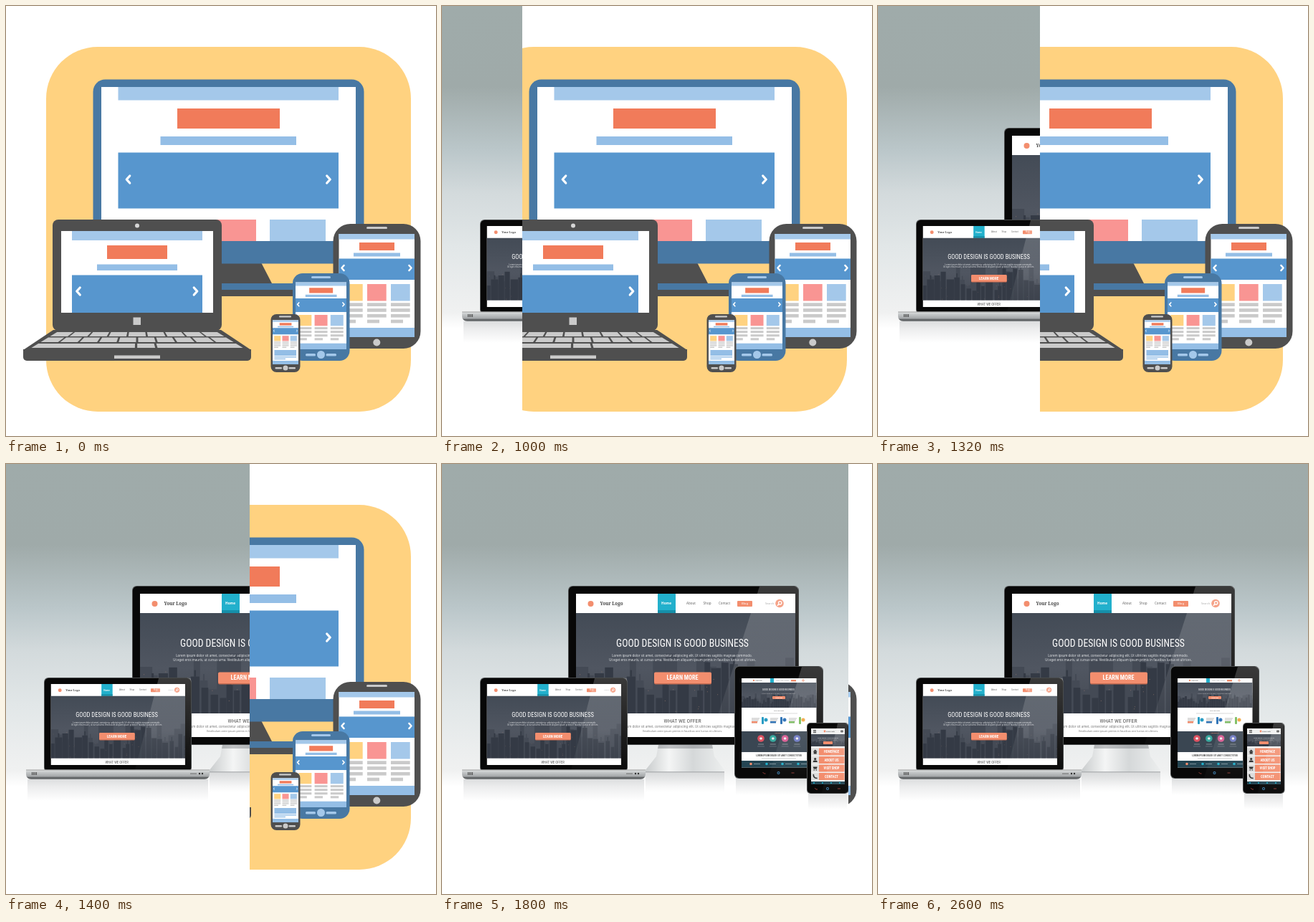
Animation, 600 px wide and 600 px high, one loop 3 s. Source, as an HTML page with a canvas:

```html
<!DOCTYPE html>
<html lang="en">
<head>
<meta charset="utf-8">
<title>Responsive devices wipe</title>
<style>
  html, body { margin: 0; width: 100%; height: 100%; overflow: hidden; background: #fff; }
  canvas { display: block; }
</style>
</head>
<body>
<canvas id="stage" width="600" height="600"></canvas>
<script>
const ctx = document.getElementById('stage').getContext('2d');
const SANS = '"Noto Sans", "Open Sans", sans-serif';
const SLAB = '"Noto Serif", "Liberation Serif", serif';
const NARROW = '"Roboto Condensed", "Liberation Sans Narrow", "Open Sans", Roboto, sans-serif';
const DARK = '#4f4f4f', STEEL = '#4878a3', SKY = '#a4c8ea', SOFT = '#94bee6', BLUE = '#5796ce';
const CORAL = '#f17b5a', PINK = '#f99593', SAND = '#ffd280', GREY = '#cacaca';
const ORANGE = '#f38e6e', TEAL = '#22b0cc', BLACK = '#080808', WHITE = '#fff';

// Shapes are given by their left, top, right and bottom edges.
function box(fill, x1, y1, x2, y2, radius = 0) {
  ctx.fillStyle = fill;
  ctx.beginPath();
  ctx.roundRect(x1, y1, x2 - x1, y2 - y1, radius);
  ctx.fill();
}
function dot(fill, x, y, r) {
  ctx.fillStyle = fill;
  ctx.beginPath();
  ctx.arc(x, y, r, 0, Math.PI * 2);
  ctx.fill();
}
function poly(fill, ...points) {
  ctx.fillStyle = fill;
  ctx.beginPath();
  points.forEach(([x, y]) => ctx.lineTo(x, y));
  ctx.fill();
}
function line(color, width, ...points) {
  ctx.strokeStyle = color;
  ctx.lineWidth = width;
  ctx.beginPath();
  points.forEach(([x, y]) => ctx.lineTo(x, y));
  ctx.stroke();
}
function shade(x1, y1, x2, y2, stops) {
  const g = ctx.createLinearGradient(x1, y1, x2, y2);
  stops.forEach(([at, color]) => g.addColorStop(at, color));
  return g;
}
function text(str, x, y, size, color, { font = SANS, weight = 400, align = 'center' } = {}) {
  ctx.fontStretch = font === NARROW ? 'extra-condensed' : 'normal';
  ctx.font = `${weight} ${size}px ${font}`;
  ctx.textAlign = align;
  ctx.textBaseline = 'middle';
  ctx.fillStyle = color;
  ctx.fillText(str, x, y);
}
// Picks the type size at which the line has the given length.
function textLine(str, x, y, length, color, style = {}) {
  const { font = SANS, weight = 400 } = style;
  ctx.fontStretch = font === NARROW ? 'extra-condensed' : 'normal';
  ctx.font = `${weight} 100px ${font}`;
  text(str, x, y, 100 * length / ctx.measureText(str).width, color, style);
}
const narrow = (str, x, y, length, color, weight = 400) =>
  textLine(str, x, y, length, color, { font: NARROW, weight });
const random = n => { const v = Math.sin(n * 12.9898) * 43758.5453; return v - Math.floor(v); };

function clipped(x1, y1, x2, y2, draw) {
  ctx.save();
  ctx.beginPath();
  ctx.rect(x1, y1, x2 - x1, y2 - y1);
  ctx.clip();
  draw();
  ctx.restore();
}

// ---- Flat scene ----
function arrows(left, right, y, size) {
  ctx.lineCap = ctx.lineJoin = 'round';
  [[left, 1], [right, -1]].forEach(([x, dir]) => line(WHITE, size * 0.65,
    [x + dir * size * 0.45, y - size], [x - dir * size * 0.45, y], [x + dir * size * 0.45, y + size]));
  ctx.lineCap = 'butt';
  ctx.lineJoin = 'miter';
}

function page(left, top, sx, sy, footer) {
  const part = (fill, x1, y1, x2, y2) =>
    box(fill, left + x1 * sx, top + y1 * sy, left + x2 * sx, top + y2 * sy);
  part(WHITE, 0, 0, 105.5, 144);
  part(SKY, 0, 0, 105.5, 7.5);
  part(CORAL, 28.5, 12, 77.5, 23);
  part(SOFT, 20.5, 26.5, 85.5, 31.5);
  part(BLUE, 0, 34.5, 105.5, 64);
  arrows(left + 5.5 * sx, left + 99.5 * sx, top + 47.5 * sy, 3.6 * sx);
  [SAND, PINK, SKY].forEach((color, i) => {
    const x = 6.5 + i * 33;
    part(color, x, 70, x + 26.7, 93.5);
    for (let row = 0; row < 4; row++)
      part(GREY, x, 96.3 + row * 7.8, x + (row < 3 ? 26.7 : 17), 101 + row * 7.8);
  });
  part(SOFT, 0, footer, 105.5, 144);
}

function keyRow(top, bottom, edges) {
  const at = (u, y) => [183 + u * (113 + (y - 455) * 1.65), y];
  for (let i = 0; i + 1 < edges.length; i++) {
    const a = edges[i] + 0.011, b = edges[i + 1] - 0.011;
    poly(GREY, at(a, top), at(b, top), at(b, bottom), at(a, bottom));
  }
}
const evenEdges = n => Array.from({ length: n + 1 }, (_, i) => i * 2 / n - 1);

function flatScene() {
  box(WHITE, 0, 0, 600, 600);
  box(SAND, 56, 57, 565, 566, 72);

  // Desktop
  poly(DARK, [250, 358], [356, 358], [371, 387], [250, 387]);
  box(STEEL, 200, 387, 410, 396);
  box(DARK, 200, 396, 410, 405);
  box(STEEL, 121.5, 102.5, 499.5, 359.5, 17);
  box(WHITE, 133, 113, 488, 328);
  box(SKY, 156.5, 113, 464, 131.5);
  box(CORAL, 239, 143, 382, 171);
  box(SOFT, 215.5, 182, 405, 194);
  box(BLUE, 156.5, 204.5, 464, 282.5);
  arrows(170.5, 450, 242, 5);
  box(PINK, 271, 298, 349, 328);
  box(SKY, 368, 298, 446, 328);

  // Laptop
  box(DARK, 65, 298, 301, 453, 8);
  dot('#d5d5d5', 183, 306.5, 3);
  box(WHITE, 77, 314, 289, 428);
  box(SKY, 92, 314, 274, 327);
  box(CORAL, 141, 334, 225, 353);
  box(SOFT, 127, 360.5, 239, 369);
  box(BLUE, 92, 375.5, 274, 428);
  arrows(101, 264.5, 398, 5);
  box(GREY, 177.5, 434.5, 188, 445);
  poly(DARK, [66, 452], [300, 452], [342, 480], [24, 480]);
  box(DARK, 24, 479, 342, 495, [0, 0, 5, 5]);
  keyRow(455, 461, evenEdges(9));
  keyRow(462.5, 469, evenEdges(10));
  keyRow(471, 477, [-1, -0.01, 0.18, 1]);
  box(GREY, 151, 487.5, 215, 492);

  // Tablet
  box(DARK, 456.5, 304, 578.5, 478, 24);
  box(GREY, 503, 308, 532, 311, 1.5);
  page(464.5, 318, 1, 1, 131);
  dot(GREY, 517.3, 469.5, 5);

  // Large phone
  box(STEEL, 400, 373, 479.5, 495, 14);
  box(SKY, 426, 377, 453, 380, 1.5);
  page(404, 385.5, 0.673, 0.65, 131);
  dot(SKY, 439.5, 486.5, 5.5);
  box(SKY, 418, 485, 432, 488.5, 1.5);
  box(SKY, 446.5, 485, 461, 488.5, 1.5);

  // Small phone
  box(DARK, 369.5, 430, 410.5, 511, 8);
  box(GREY, 381, 432.3, 398, 434.5, 1);
  box(WHITE, 372, 438.5, 408, 500);
  page(372, 438.5, 0.341, 0.31, 144);
  box(WHITE, 372, 479, 408, 500);
  box(SOFT, 374.5, 480, 405, 488);
  box(SOFT, 374.5, 489, 405, 490.5);
  box(SOFT, 374.5, 491.7, 390, 493.2);
  box(SOFT, 372, 495, 408, 500);
  dot(GREY, 390, 505, 3.5);
  box(GREY, 375.5, 504, 385, 506.5, 1);
  box(GREY, 394.5, 504, 404, 506.5, 1);
}

// ---- Glossy scene ----
function skyline(x1, y1, x2, y2) {
  const height = y2 - y1, unit = height / 140;
  box(shade(0, y1, 0, y2, [[0, '#434b56'], [0.55, '#505661'], [1, '#454a54']]), x1, y1, x2, y2);
  clipped(x1, y1, x2, y2, () => {
    ['#444a55', '#343a45'].forEach((color, layer) => {
      for (let x = x1, n = 1 + layer * 50; x < x2; n++) {
        const width = (7 + random(n) * 11) * unit;
        const top = y2 - height * (0.2 + 0.4 * random(n + 0.5) - layer * 0.06);
        box(color, x, top, x + width, y2);
        if (n % 4 === 0) box(color, x + width * 0.4, top - 9 * unit, x + width * 0.6, top);
        x += width * (1 + layer * 0.35 * random(n + 0.2));
      }
    });
    for (let n = 1; n < 26; n++) {
      const x = x1 + (x2 - x1) * random(n * 3), y = y2 - height * 0.42 * random(n * 7);
      box('rgba(190,145,125,.5)', x, y, x + unit, y + unit);
    }
  });
}

function magnifier(x, y, r) {
  dot(ORANGE, x, y, r);
  ctx.beginPath();
  ctx.arc(x + r * 0.12, y - r * 0.12, r * 0.38, 0, Math.PI * 2);
  ctx.strokeStyle = WHITE;
  ctx.lineWidth = r * 0.22;
  ctx.stroke();
  line(WHITE, r * 0.25, [x - r * 0.15, y + r * 0.15], [x - r * 0.55, y + r * 0.55]);
}

function website() {
  box(WHITE, 187, 181, 493, 381);
  dot(ORANGE, 207.5, 195, 4);
  textLine('Your Logo', 236.5, 195, 32, '#444', { font: SLAB, weight: 700 });
  box(TEAL, 301, 181, 326, 208);
  box('#168fa9', 301, 204, 326, 208);
  textLine('Home', 313, 195, 14, WHITE, { weight: 700 });
  textLine('About', 347.5, 195, 13, '#666');
  textLine('Shop', 370, 195, 11, '#666');
  textLine('Contact', 394, 195, 16, '#666');
  box(ORANGE, 412, 191, 433, 199, 1);
  textLine('Blog', 422.5, 195, 9, WHITE);
  textLine('Search', 457, 195, 12, '#999');
  magnifier(471, 194.5, 5.8);

  skyline(187, 208, 493, 348);
  narrow('GOOD DESIGN IS GOOD BUSINESS', 335.5, 251, 185, WHITE);
  textLine('Lorem ipsum dolor sit amet, consectetur adipiscing elit. Ut ultricies sagittis magnae commodo.',
    335, 268, 196, '#e4e6e8');
  textLine('Ut eget eros mauris, ut cursus urna. Vestibulum aliquam ipsum primis in faucibus luctus et ultrices.',
    335.5, 273.5, 205, '#e4e6e8');
  box('#c96f54', 296, 292, 376, 307.5, 2);
  box(ORANGE, 296, 290.5, 376, 306, 2);
  narrow('LEARN MORE', 335.5, 299, 44, WHITE, 700);
  narrow('WHAT WE OFFER', 335.5, 358.5, 52, '#555');
  textLine('Lorem ipsum dolor sit amet, consectetur adipiscing elit. Ut ultricies sagittis magnae commodo.',
    335, 367, 196, '#777');
  textLine('Vestibulum ante ipsum primis in faucibus orci luctus et ultrices.', 335.5, 372.5, 112, '#777');
}

function casing(x1, y1, x2, y2, radius) {
  box('#5c5f60', x1, y1, x2, y2, radius);
  box(BLACK, x1 + 0.8, y1 + 0.8, x2 - 0.8, y2 - 0.8, radius);
}
function glare(x1, x2, top, right, bottom) {
  poly(shade(0, top, 0, bottom, [[0, 'rgba(255,255,255,.2)'], [1, 'rgba(255,255,255,.02)']]),
    [x1, top], [right, top], [right, bottom], [x2, bottom]);
}
function reflection(x1, x2, top, bottom) {
  box(shade(0, top, 0, bottom, [[0, 'rgba(110,115,120,.2)'], [1, 'rgba(110,115,120,0)']]), x1, top, x2, bottom);
}
function navKeys(x, y, gap) {
  line('#8d3a34', 1, [x - gap - 2, y - 1], [x - gap, y + 1], [x - gap + 2, y + 1]);
  dot('#3b7fb0', x, y, 2);
  dot(BLACK, x, y, 1);
  line('#8d3a34', 1, [x + gap - 2, y], [x + gap + 2, y]);
}

function glossyDesktop() {
  reflection(284, 394, 430, 458);
  poly(shade(284, 0, 394, 0, [[0, '#c9cccd'], [0.3, '#f4f5f5'], [0.6, '#d5d8d9'], [1, '#eceeee']]),
    [302, 392], [377, 392], [380, 408], [394, 427], [394, 430], [284, 430], [284, 427], [299, 408]);
  poly('rgba(70,75,80,.3)', [302, 392], [377, 392], [378, 397], [301, 397]);
  line('#9ea2a4', 1, [284, 429.8], [394, 429.8]);
  casing(176, 170, 498, 392, 6);
  website();
  glare(443, 372, 171, 497, 391);
}

function glossyLaptop() {
  reflection(30, 282, 440, 470);
  casing(53, 298, 259, 430, 6);
  clipped(62.5, 307, 250, 420, () => {
    ctx.translate(62.5, 307);
    ctx.scale(0.62, 0.62);
    ctx.translate(-187, -181);
    website();
  });
  glare(213, 180, 299, 258, 427);
  box(shade(0, 426, 0, 440, [[0, '#f5f6f6'], [0.25, '#c9cccd'], [0.7, '#a4a7a9'], [0.85, '#55585a'], [1, '#8b8e90']]),
    28, 426.5, 284, 440, [2, 2, 7, 7]);
  line('#777', 0.7, [28, 427], [284, 427]);
  for (let x = 36; x < 44; x += 2) box('#444', x, 430, x + 1, 434);
  box('#777', 257, 431.5, 266, 432.7);
  dot('#333', 270, 432, 1.2);
  dot('#333', 274, 432, 1.2);
}

function glossyTablet() {
  reflection(410, 530, 438, 462);
  casing(408, 282, 532, 439, 6);
  box(WHITE, 418, 299, 522.5, 423.5);
  dot(ORANGE, 435, 302, 1.2);
  textLine('Your Logo', 442, 302, 9, '#444', { font: SLAB, weight: 700 });
  box(TEAL, 458, 299, 463, 305);
  textLine('About  Shop  Contact', 475, 302, 18, '#777');
  box(ORANGE, 487, 301, 494, 303.5);
  magnifier(504, 302, 1.7);
  skyline(418, 305, 522.5, 340);
  narrow('GOOD DESIGN IS GOOD BUSINESS', 469.5, 315, 45, WHITE);
  textLine('Lorem ipsum dolor sit amet, consectetur adipiscing', 469.5, 320, 46, '#ccc');
  box(ORANGE, 461, 324, 479, 328, 1);
  narrow('LEARN MORE', 470, 326, 10, WHITE, 700);
  narrow('WHAT WE OFFER', 470, 344.5, 14, '#555');
  line('#bbb', 0.6, [444, 348], [496, 348]);
  ['#2a9cc4', '#3577b8', '#74b956'].forEach((color, i) => {
    const x = 432 + i * 26;
    for (let row = 0; row < 4; row++) line('#aaa', 0.8, [x, 355 + row * 2], [x + 11 - row, 355 + row * 2]);
    box(i ? color : ORANGE, x, 359, x + 8, 361.5);
    box(color, x + 14, 353, x + 17, 363, 1);
    dot(i === 2 ? '#f0a33c' : color, x + 20, 357, 2.5);
  });
  box('#3a4652', 418, 373, 522.5, 402);
  narrow('OUR SKILLS', 470, 375.5, 11, ORANGE, 700);
  ['#dd5261', '#39a99f', '#d8578f', '#6b77c2'].forEach((color, i) => {
    const x = 445 + i * 16.8;
    dot(color, x, 383, 4.8);
    box('#f1eeee', x - 1.7, 381.5, x + 1.7, 384.5, 1);
    line('#a6adb3', 0.7, [x - 4, 391], [x + 4, 391]);
    line('#7d8790', 0.6, [x - 5, 394], [x + 5, 394]);
  });
  narrow('LOREM IPSUM DOLOR SIT AMET CONSECTETUR', 470, 407, 64, '#555', 700);
  line('#aaa', 0.6, [446, 411], [494, 411]);
  box('#244553', 418, 414, 522.5, 423.5);
  for (let x = 431; x < 515; x += 22) {
    dot(x === 431 ? ORANGE : TEAL, x, 418.5, 1.8);
    line('#91a5ae', 0.8, [x + 4, 418.5], [x + 13, 418.5]);
  }
  navKeys(469.5, 431, 20);
  glare(502, 455, 283, 531, 438);
}

const menuIcons = [
  (x, y) => { poly('#333', [x - 3, y], [x, y - 3], [x + 3, y]); box('#333', x - 2, y, x + 2, y + 3); },
  (x, y) => { dot('#333', x, y - 1.5, 1.6); box('#333', x - 3, y + 0.5, x + 3, y + 3, [2, 2, 0, 0]); },
  (x, y) => { poly('#333', [x - 3, y - 2], [x + 3, y - 2], [x + 2, y + 1], [x - 2, y + 1]);
    dot('#333', x - 1.5, y + 2.5, 0.8); dot('#333', x + 1.5, y + 2.5, 0.8); },
  (x, y) => line('#333', 1.6, [x - 2.5, y - 3], [x - 2, y], [x, y + 2], [x + 3, y + 2.5])
];

function glossyPhone() {
  reflection(511, 565, 460, 482);
  casing(509, 361, 567.5, 460, 5);
  box('#f0f1f1', 515, 369, 562, 447);
  for (let y = 371.5; y < 376; y += 1.6) line('#333', 0.8, [518, y], [522, y]);
  dot(ORANGE, 534, 373, 1.4);
  textLine('Your Logo', 542, 373, 12, '#444', { font: SLAB, weight: 700 });
  box('#555', 556, 371.5, 560, 374.5, 1);
  skyline(515, 377, 562, 394);
  narrow('GOOD DESIGN IS GOOD BUSINESS', 538.5, 382, 29, WHITE);
  line('#aaa', 0.5, [526, 385], [551, 385]);
  box(ORANGE, 532, 387, 545, 391, 0.5);
  ['HOMEPAGE', 'ABOUT US', 'VISIT SHOP', 'CONTACT'].forEach((label, i) => {
    const y = 396.5 + i * 11.5;
    box('#dcdcdc', 515.5, y, 526, y + 10);
    menuIcons[i](520.7, y + 5);
    box(ORANGE, 526, y, 561.5, y + 10);
    narrow(label, 543.5, y + 5.3, [21, 20, 22, 19][i], WHITE, 700);
  });
  box('#244553', 515, 443, 562, 447);
  for (let x = 519; x < 560; x += 12) dot(TEAL, x, 445, 1.1);
  navKeys(538, 453, 16);
  glare(552, 530, 362, 566, 459);
}

function glossyScene() {
  box(shade(0, 0, 0, 450, [[0, '#9fabaa'], [0.25, '#9faaa9'], [0.45, '#bbc7ca'], [0.58, '#d3dadc'],
    [0.75, '#e2e7e8'], [0.95, '#f0f1f1'], [1, WHITE]]), 0, 0, 600, 600);
  glossyDesktop();
  glossyLaptop();
  glossyTablet();
  glossyPhone();
}

// ---- Stepped wipe ----
function wipeEdge(time) {
  if (time < 1000) return 0;
  return Math.min(600, Math.round(112 + 113.75 * Math.floor((time - 1000) / 200)));
}

let shownEdge = -1;
function render(now) {
  const edge = wipeEdge(now % 3000);
  if (edge !== shownEdge) {
    shownEdge = edge;
    flatScene();
    if (edge) clipped(0, 0, edge, 600, glossyScene);
  }
  requestAnimationFrame(render);
}
render(performance.now());
</script>
</body>
</html>
```
